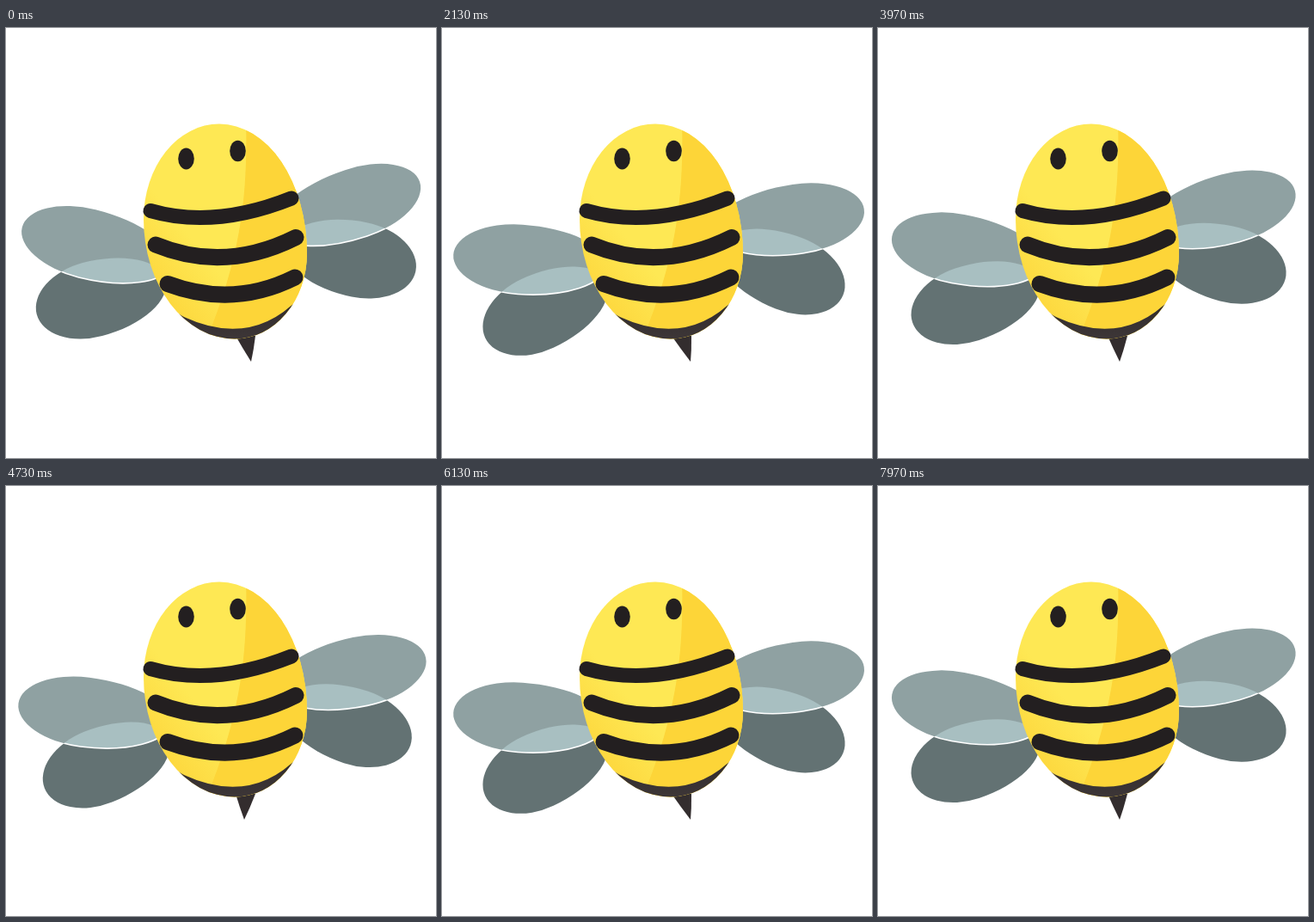
Write an HTML page that moves like this. It is 500 px wide and 500 px high and loops after 8010 ms.

```html
<!DOCTYPE html>
<html lang="en">
<head>
<meta charset="utf-8">
<title>Bee</title>
<style>
  html, body { margin: 0; width: 100%; height: 100%; overflow: hidden; background: #fff; }
  svg { display: block; width: 100vw; height: 100vh; }
  .lower { fill: #637273; }
  .upper { fill: #8fa1a2; }
  .overlap { fill: #a8bfc1; stroke: #fff; stroke-width: 1.6; }
  .stripes { fill: none; stroke: #231f20; stroke-width: 19; stroke-linecap: round; }
  .stripes .thin { stroke-width: 17; }
  .eyes { fill: #231f20; }
</style>
</head>
<body>
<svg viewBox="0 0 500 500">
  <defs>
    <path id="upperL"/>
    <path id="lowerL"/>
    <path id="upperR"/>
    <path id="lowerR"/>
    <clipPath id="clipL"><use href="#lowerL"/></clipPath>
    <clipPath id="clipR"><use href="#lowerR"/></clipPath>
    <clipPath id="clipBody">
      <path d="M248 111.5A102 150.5 0 0 1 350 262A84 99.5 0 0 1 266 361.5A106 139.5 0 0 1 160 222A88 110.5 0 0 1 248 111.5Z"/>
    </clipPath>
    <linearGradient id="light" gradientUnits="userSpaceOnUse" x1="170" y1="300" x2="225" y2="256">
      <stop offset="0" stop-color="#fdd83e"/>
      <stop offset="1" stop-color="#fee854"/>
    </linearGradient>
    <linearGradient id="dark" x1="0" y1="0" x2="0" y2="1">
      <stop offset="0" stop-color="#2a2526"/>
      <stop offset="1" stop-color="#423b3c"/>
    </linearGradient>
  </defs>

  <use class="lower" href="#lowerL"/>
  <use class="upper" href="#upperL"/>
  <g clip-path="url(#clipL)"><use class="overlap" href="#upperL"/></g>
  <use class="lower" href="#lowerR"/>
  <use class="upper" href="#upperR"/>
  <g clip-path="url(#clipR)"><use class="overlap" href="#upperR"/></g>

  <path id="sting" fill="#332d2e" d="M267 358Q274 372 283 388Q287 374 290 358Z"/>

  <g clip-path="url(#clipBody)">
    <rect x="150" y="105" width="210" height="265" fill="url(#light)"/>
    <path fill="#fdd538" d="M279 100C281 190 276 260 230 370H370V100Z"/>
    <path fill="url(#dark)" d="M200 332L207 336Q285 372 341 314L360 296V380H200Z"/>
  </g>
  <g class="stripes">
    <path class="thin" d="M168 212.5Q242 234 332 198"/>
    <path d="M174 252Q254 285 337 243.5"/>
    <path d="M188 297.5Q264 326 336 290"/>
  </g>
  <g class="eyes">
    <ellipse cx="209.5" cy="152" rx="9.3" ry="12.4"/>
    <ellipse cx="269.5" cy="143" rx="9.3" ry="12.2"/>
  </g>
</svg>
<script>
  const LOOP = 8010, BEAT = 10, FLAP = 10 / 3;
  const el = id => document.getElementById(id);

  // egg shape: widest at x, long radius towards the body, short one towards the tip
  const leaf = (x, inner, outer, half) =>
    `M${x} ${-half}A${inner} ${half} 0 0 1 ${x} ${half}A${outer} ${half} 0 0 1 ${x} ${-half}Z`;
  const upper = leaf(-14, 100, 78, 40.5);
  const lower = leaf(-14, 88, 67, 44);

  // dir: turning sense, pivot, rest centre, rest tilt
  const wings = [
    { id: 'upperL', d: upper, dir: -1, px: 198, py: 279, x: 108, y: 254, tilt: 14 },
    { id: 'lowerL', d: lower, dir: -1, px: 199, py: 264, x: 114, y: 312, tilt: -15 },
    { id: 'upperR', d: upper, dir: 1, px: 305, py: 250, x: 393.8, y: 208, tilt: -18.5 },
    { id: 'lowerR', d: lower, dir: 1, px: 314, py: 240, x: 397, y: 266.5, tilt: 11.5 }
  ];
  for (const w of wings) {
    w.node = el(w.id);
    w.node.setAttribute('d', w.d);
  }
  const sting = el('sting');

  // distance between two poses on the beat circle
  const gap = (a, b) => {
    const d = Math.abs(a - b) % BEAT;
    return Math.min(d, BEAT - d);
  };

  // 25 poses a second shown on a 30 Hz clock: each sixth tick holds
  function poseAt(t) {
    const tick = Math.min(239, Math.floor((Math.floor(t / 10) * 10 + 4) * 0.03));
    return (Math.floor(tick / 6) * 5 + Math.max(0, tick % 6 - 1)) % BEAT;
  }

  function draw(now) {
    const pose = poseAt(now % LOOP);
    const angle = FLAP * gap(pose, 0);
    for (const w of wings) {
      w.node.setAttribute('transform',
        `rotate(${w.dir * angle} ${w.px} ${w.py}) translate(${w.x} ${w.y}) rotate(${w.tilt}) scale(${-w.dir} 1)`);
    }
    const lean = (10 - 4 * gap(pose, 2)) / 30;
    sting.setAttribute('transform', `matrix(1 0 ${lean} 1 ${-lean * 358} 0)`);
  }

  function loop() {
    draw(performance.now());
    requestAnimationFrame(loop);
  }
  loop();
</script>
</body>
</html>
```
